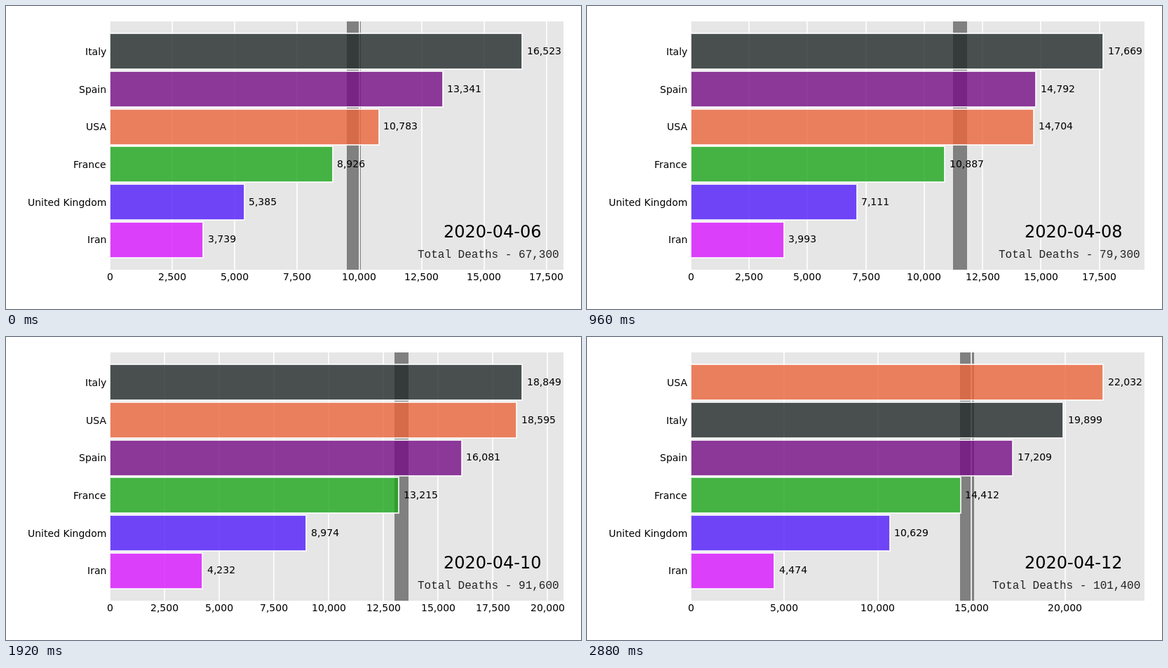
These frames come from a looping animation (820 px wide and 432 px high, 2960 ms). An HTML page with a canvas:

```html
<!DOCTYPE html>
<html lang="en">
<head>
<meta charset="utf-8">
<title>Bar chart race</title>
<style>
  html, body { margin: 0; width: 100%; height: 100%; overflow: hidden; background: #fff; }
  canvas { display: block; }
</style>
</head>
<body>
<canvas id="chart" width="820" height="432"></canvas>
<script>
const ctx = document.getElementById('chart').getContext('2d');

const STEP_MS = 80, STEPS_PER_DAY = 6, STEP_COUNT = 37, FIRST_DAY = 6;
const plot = { left: 148, right: 795, top: 22, bottom: 376 };
const plotWidth = plot.right - plot.left;
const rowHeight = (plot.bottom - plot.top) / 6.6;
const barHeight = rowHeight * 0.95;
const sans = size => `${size}px "DejaVu Sans", sans-serif`;

// One value per day, listed in painting order.
const countries = [
  { name: 'France', color: '#1CA71C', daily: [8926, 10343, 10887, 12228, 13215, 13851, 14412] },
  { name: 'Iran', color: '#DA16FF', daily: [3739, 3872, 3993, 4110, 4232, 4357, 4474] },
  { name: 'Italy', color: '#222A2A', daily: [16523, 17127, 17669, 18279, 18849, 19468, 19899] },
  { name: 'Spain', color: '#750D86', daily: [13341, 14045, 14792, 15447, 16081, 16606, 17209] },
  { name: 'USA', color: '#EB663B', daily: [10783, 12798, 14704, 16553, 18595, 20471, 22032] },
  { name: 'United Kingdom', color: '#511CFB', daily: [5385, 6171, 7111, 7993, 8974, 9892, 10629] }
];
const others = [8651, 9494, 10181, 10872, 11646, 12236, 12712];

for (const c of countries) {
  c.ranks = c.daily.map((v, day) => countries.filter(o => o.daily[day] > v).length);
}

const sum = list => list.reduce((a, b) => a + b, 0);
const commas = n => Math.round(n).toLocaleString('en-US');

function sample(list, step) {
  const day = Math.floor(step / STEPS_PER_DAY);
  const part = (step % STEPS_PER_DAY) / STEPS_PER_DAY;
  return part ? list[day] + (list[day + 1] - list[day]) * part : list[day];
}

function text(str, x, y, align = 0, font = sans(14), color = '#000') {
  ctx.font = font;
  ctx.fillStyle = color;
  ctx.fillText(str, Math.round(x - ctx.measureText(str).width * align), Math.round(y));
}

function drawBar(bar) {
  const top = Math.round(bar.y - barHeight / 2);
  const bottom = Math.round(bar.y + barHeight / 2);
  const rect = [plot.left, top, Math.round(bar.end) - plot.left, bottom - top];
  ctx.globalAlpha = 0.8;
  ctx.fillStyle = bar.color;
  ctx.fillRect(...rect);
  ctx.strokeStyle = '#fff';
  ctx.lineWidth = 2;
  ctx.strokeRect(...rect);
  ctx.globalAlpha = 1;
}

function draw(step) {
  const values = countries.map(c => sample(c.daily, step));
  const axisMax = Math.max(...values) * 1.1;
  const toX = v => plot.left + v / axisMax * plotWidth;
  const bars = countries.map((c, i) => ({
    name: c.name,
    color: c.color,
    value: values[i],
    end: toX(values[i]),
    y: plot.top + rowHeight * (0.8 + sample(c.ranks, step))
  }));
  const tickStep = axisMax > 22500 ? 5000 : 2500;
  const ticks = [];
  for (let v = 0; v <= axisMax; v += tickStep) ticks.push(v);

  ctx.fillStyle = '#fff';
  ctx.fillRect(0, 0, 820, 432);

  ctx.save();
  ctx.beginPath();
  ctx.rect(plot.left, plot.top, plotWidth, plot.bottom - plot.top);
  ctx.clip();
  ctx.fillStyle = '#e6e6e6';
  ctx.fillRect(0, 0, 820, 432);

  // Mean marker
  ctx.fillStyle = '#808080';
  ctx.fillRect(Math.round(toX(sum(values) / values.length)) - 10, 0, 20, 432);

  ctx.fillStyle = '#fff';
  for (const v of ticks) ctx.fillRect(Math.round(toX(v)) - 0.8, 0, 1.6, 432);
  bars.forEach(drawBar);
  ctx.restore();

  for (const v of ticks) text(commas(v), toX(v), 391, 0.5);
  for (const b of bars) {
    text(b.name, 143, b.y + 5.3, 1);
    text(commas(b.value), b.end + plotWidth * 0.01, b.y + 4.2);
  }

  const day = FIRST_DAY + Math.floor(step / STEPS_PER_DAY);
  text(`2020-04-${String(day).padStart(2, '0')}`, 763, 330, 1, sans(24));
  const total = Math.round((sum(values) + sample(others, step)) / 100) * 100;
  text(`Total Deaths - ${commas(total)}`, 789, 359, 1, '16px "Liberation Mono", monospace', '#222');
}

function tick() {
  draw(Math.floor(performance.now() / STEP_MS) % STEP_COUNT);
  requestAnimationFrame(tick);
}
tick();
</script>
</body>
</html>
```
